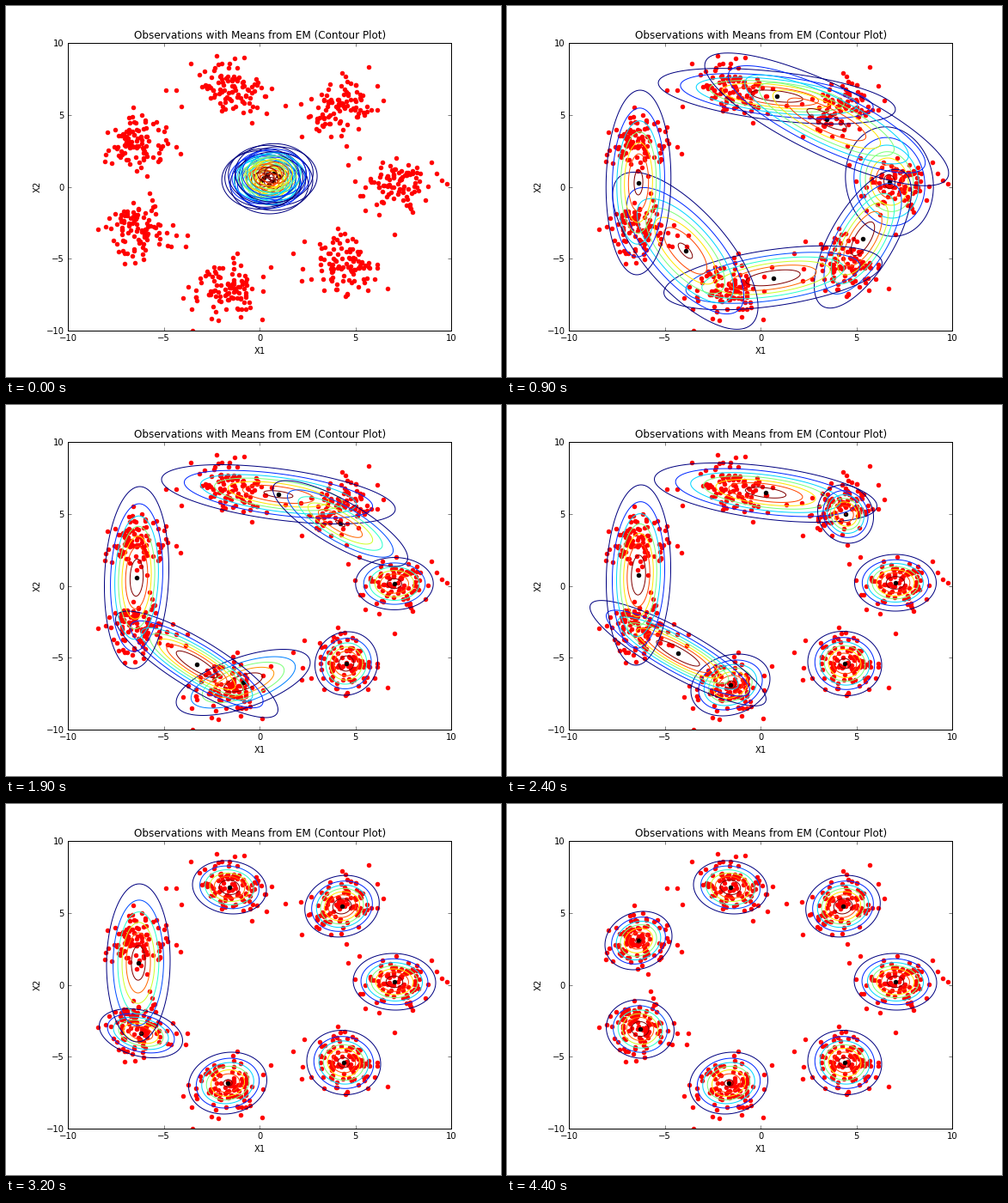
Write a matplotlib script that moves like this. It is 576 by 432 pixels and loops after 5400 ms.

```python
import numpy as np
import matplotlib.pyplot as plt
from matplotlib.animation import FuncAnimation
from matplotlib.collections import LineCollection

W, H, DPI = 576, 432, 72
UNIT = np.array([22.32, 16.74])      # pixels per data unit
CENTRE = np.array([295.2, 210.6])    # pixel position of (0, 0)
KEYS = [1, 5, 13, 19, 24, 32, 39]    # EM iterations of the key poses
STEPS = [1, 1.5, 2, 2.5, 3, 4, 5, 6, 8, 10]
FRAMES, INTERVAL = 54, 100

plt.rcParams.update({
    "font.family": "DejaVu Sans", "font.size": 10,
    "axes.linewidth": 1.0, "axes.titlesize": 12, "axes.labelsize": 10,
    "xtick.direction": "in", "ytick.direction": "in",
    "xtick.top": True, "ytick.right": True,
    "xtick.major.size": 4, "ytick.major.size": 4,
    "xtick.major.width": 0.5, "ytick.major.width": 0.5,
    "xtick.major.pad": 4, "ytick.major.pad": 4,
})

rng = np.random.default_rng(12)
theta = np.linspace(0, 2 * np.pi, 121)
paths, clouds = [], []


def to_data(px):
    return (np.asarray(px, float) - CENTRE) / UNIT * [1, -1]


def peak(sx, sy, rho):
    return 0.998 / (2 * np.pi * sx * sy * np.sqrt(1 - rho ** 2))


def levels(top):
    """Evenly spaced round contour levels, at most eight bins."""
    raw = top / 8
    scale = 10 ** np.floor(np.log10(raw))
    step = next(s for s in STEPS if s * scale >= raw * 0.9999) * scale
    lev = step * np.arange(1, 9)
    return lev[lev < top]


def radius(top, level):
    return np.sqrt(2 * np.log(top / level))


def pose(x, y, w, h, rho):
    """Gaussian whose outermost contour has half extents w, h in pixels."""
    half = np.array([w, h]) / UNIT
    sig = half / 2
    for _ in range(8):
        top = peak(*sig, rho)
        sig = half / radius(top, levels(top)[0])
    return [*to_data((x, y)), *sig, rho]


def add_blob(poses, strays):
    x, y, w, h, rho = poses[0]
    cx, cy = CENTRE
    first = (x + 0.07 * (cx - x), y + 0.07 * (cy - y), w * 1.07, h * 1.07, rho)
    track = np.array([pose(*p) for p in [first] + poses])
    if len(track) < len(KEYS):
        track = np.vstack([track, track[-1]])
    paths.append(track)

    mx, my, sx, sy, rho = track[-1]
    z = rng.normal(size=(160, 2))
    z = z[np.hypot(*z.T) < 1.95][:90]
    clouds.append(np.column_stack([
        mx + sx * z[:, 0],
        my + sy * (rho * z[:, 0] + np.sqrt(1 - rho ** 2) * z[:, 1])]))
    clouds.append(to_data(strays))


# right
add_blob([(437, 204, 54, 95, -0.1), (453, 205, 46, 28, -0.08),
          (452, 208, 47.5, 32, 0), (452, 207, 47.5, 33, 0),
          (452, 207, 48, 33, -0.03)],
         [(398, 185), (411, 177), (452, 266), (495, 182), (507, 203),
          (513, 207), (501, 195), (418, 238), (434, 243), (473, 240)])
# lower right
add_blob([(423, 256, 68.5, 94, 0.75), (405, 286, 43.5, 66, 0.6),
          (396, 301, 36.5, 37, 0.05), (393, 301, 43, 37.5, -0.05),
          (393, 301, 43, 37.5, -0.05)],
         [(334, 288), (347, 274), (345, 306), (344, 320), (386, 259),
          (444, 329), (432, 305), (395, 338), (421, 331), (355, 318)])
# bottom
add_blob([(312, 316, 130, 36, 0.42), (307, 317, 124, 38.5, 0.5),
          (276, 323, 78, 38.5, 0.6), (260, 326, 46, 36, 0.2),
          (258, 325, 45.5, 36, 0.1)],
         [(308, 304), (298, 365), (299, 332), (217, 378), (206, 340),
          (212, 327), (239, 364), (247, 366), (273, 362), (216, 353),
          (269, 288)])
# lower left
add_blob([(192, 265, 95, 129, -0.68), (223, 305, 77.5, 58, -0.74),
          (222, 302, 94.5, 62, -0.85), (199, 289, 101, 60.5, -0.87),
          (157, 267, 48.5, 28.5, -0.3), (155, 262, 40, 34.5, -0.05)],
         [(107, 260), (116, 257), (211, 267), (209, 280), (198, 267),
          (194, 255), (192, 280), (138, 300), (150, 299), (167, 218),
          (170, 226)])
# left
add_blob([(154, 208, 38.5, 108, 0), (152, 203, 37, 107, 0.1),
          (152, 201, 37.5, 106, 0.1), (153, 198, 37.5, 105, 0.08),
          (154, 185, 37, 92, 0.03), (153, 159, 39, 34, 0.15)],
         [(186, 156), (198, 164), (203, 172), (148, 118), (115, 181),
          (116, 173), (118, 147), (164, 198), (152, 192), (188, 160),
          (158, 127)])
# upper left
add_blob([(310, 105, 137, 31.5, -0.45), (318, 105, 138, 33, -0.5),
          (317, 104, 136, 34.5, -0.5), (301, 102, 129.5, 34.5, -0.45),
          (260, 97, 43, 31, -0.1)],
         [(215, 67), (245, 58), (266, 61), (277, 60), (186, 98), (198, 98),
          (204, 117), (309, 96), (286, 136), (303, 125), (325, 116),
          (251, 67)])
# upper right
add_blob([(368, 130, 146.5, 79, -0.75), (376, 134, 130, 71.5, -0.87),
          (389, 138, 78.5, 50, -0.8), (394, 127, 32.5, 34, -0.1),
          (391, 119, 41, 34, 0.1)],
         [(422, 71), (391, 78), (395, 82), (343, 114), (344, 152),
          (396, 163), (432, 121), (439, 110), (354, 128), (432, 93)])

START = [(0.96, 0.75), (0.73, 0.4), (0.5, 0.16), (0.06, 0.48),
         (0.22, 0.62), (0.4, 0.85), (0.75, 0.97)]


def state(i):
    if i == 0:
        return [(x, y, 1, 1, 0) for x, y in START]
    return [[np.interp(i, KEYS, col) for col in track.T] for track in paths]


def rings(mx, my, sx, sy, rho):
    top = peak(sx, sy, rho)
    lev = levels(top)
    u = np.cos(theta)
    v = rho * u + np.sqrt(1 - rho ** 2) * np.sin(theta)
    segs = [np.column_stack([mx + r * sx * u, my + r * sy * v])
            for r in radius(top, lev)]
    return segs, plt.cm.jet(np.linspace(0, 1, len(lev)))


fig = plt.figure(figsize=(W / DPI, H / DPI), dpi=DPI, facecolor="white")
ax = fig.add_axes([0.125, 0.125, 0.775, 0.775])
ax.set(xlim=(-10, 10), ylim=(-10, 10),
       xticks=range(-10, 11, 5), yticks=range(-10, 11, 5))
ax.set_xlabel("X1", labelpad=5)
ax.set_ylabel("X2", labelpad=5)
ax.set_title("Observations with Means from EM (Contour Plot)", y=1, pad=5)

ax.scatter(*np.vstack(clouds).T, s=20, color="red", linewidths=1, zorder=1)
means = ax.scatter([], [], s=20, color="black", linewidths=1, zorder=1.5)
contours = LineCollection([], linewidths=1, zorder=2)
ax.add_collection(contours, autolim=False)


def draw(i):
    blobs = state(i)
    parts = [rings(*b) for b in blobs]
    means.set_offsets([b[:2] for b in blobs])
    contours.set_segments([s for segs, _ in parts for s in segs])
    contours.set_color(np.vstack([c for _, c in parts]))
    return means, contours


anim = FuncAnimation(fig, draw, frames=FRAMES, interval=INTERVAL,
                     init_func=lambda: draw(0), repeat=True, repeat_delay=0)
plt.show()
```
